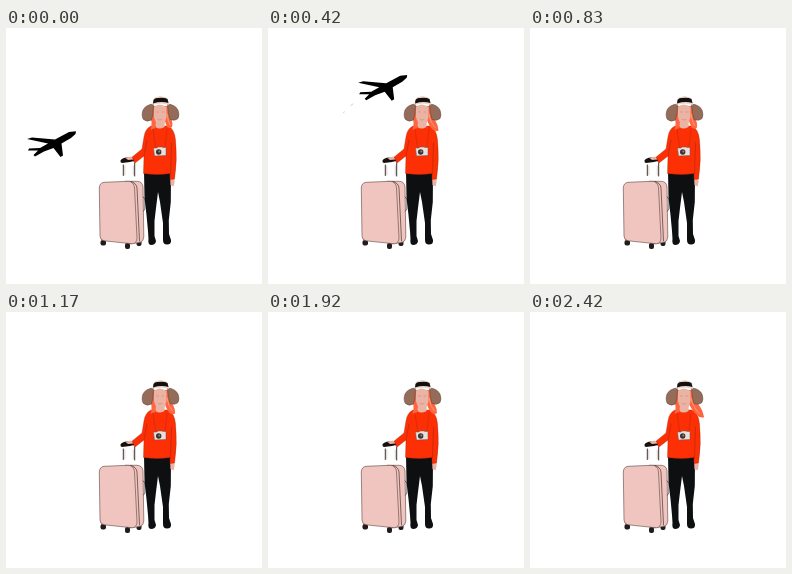
These frames come from a looping animation (256 px wide and 256 px high, 2.51 s). An HTML page:

```html
<!DOCTYPE html>
<html lang="en">
<head>
<meta charset="utf-8">
<title>Traveller</title>
<style>
html, body { margin: 0; width: 100%; height: 100%; overflow: hidden; background: #fff; }
svg { display: block; width: 100%; height: 100%; }
.line { fill: none; stroke: #2b1b19; stroke-width: .6; stroke-linecap: round; }
.case { fill: #f1c5bf; stroke: #5b4340; stroke-width: .6; }
.skin { fill: #eab3a4; }
.hair { fill: #ff6540; }
.top { fill: #fd2f05; stroke: #a82a10; stroke-width: .4; }
.brim { fill: #946c59; stroke: #5a4236; stroke-width: .5; }
</style>
</head>
<body>
<svg viewBox="0 0 256 256">
  <g id="plane">
    <path d="M21 111 26 109.500 49 111.500 63 104 70 103.300 69.500 106 65 110 55.500 115.500 57 127.500 54.500 129 47.500 120 38 123.500 29 128.500 27.500 127 32 122.500 22 122.500 23 120.500 34 120 42 115.500Z"/>
    <path id="trail" d="M16 132l-2.500 2M7.500 140l-1.500 1.200" stroke="#bbb" stroke-width=".8"/>
  </g>

  <g id="suitcase">
    <path d="M117.300 137V147.500M128.700 135V148" class="line" style="stroke-width:.9"/>
    <path d="M118.800 138V147M127.300 138V147" class="line" style="stroke:#b9aaa7"/>
    <g fill="#211b1b">
      <rect x="94.500" y="212" width="5.500" height="5.500" rx="2"/>
      <rect x="119" y="215" width="5" height="6" rx="2"/>
      <rect x="130.500" y="212" width="5" height="6" rx="2"/>
    </g>
    <path class="case" d="M119 153.300H131Q136.500 153.500 137 159L137.800 209Q137.500 213.500 134 214.500L124 215.800Z"/>
    <path class="case" d="M98 154.300 122 153.300Q128 153.300 128.500 160L131 210Q131 215 126.500 215.800L98 212.800Q94 212 94 208L93.300 160Q93.500 155 98 154.300Z"/>
    <path class="line" d="M125 153.500Q130.500 155 131 160L133.500 213M137.200 169 138.800 171V181L137.500 183"/>
  </g>

  <g id="legs" fill="#0e0f11">
    <path d="M138 143H165L164.800 174 162.800 192 163 206 165 212Q165.500 216.500 161 216.500 157 216.500 157 212L157 195 154 174 152 164 150 180 148.500 193 148.500 208 150 213Q149.500 217 145 217 141.500 216.500 142.500 211L142 203 140.500 187 138.500 170Z"/>
  </g>

  <path class="skin" d="M164 147 168 147Q169.500 153 167.500 158.500L164.500 157Z"/>
  <path class="top" d="M145 98Q139 101 138 109L136 121 125 130 129 135 138 128 137.500 145.500Q152 147.500 164 145.500L164 151.500 168.500 151Q171.500 132 169.500 112 168.500 101 162 98Z"/>
  <path class="line" style="stroke:#a82a10" d="M141 112 138 128M165.500 115 164.500 146"/>

  <path d="M114.500 132.500Q116 129.800 121 129.500L127 130.500 128 133 124 134 116 135Q114 134.500 114.500 132.500Z" fill="#17100f"/>
  <path class="skin" d="M119.500 130 125 128.500 127.500 131.500 122 132Z"/>

  <path class="skin" d="M149 90H159L158.500 99Q153 102 149.500 99Z"/>
  <path class="hair" d="M146 78H163L163 92 146 92Z"/>
  <path class="hair" d="M146 80Q144 89 145.500 94 146 98 144.500 102L149.500 100 150 93 149 80Z"/>
  <path class="hair" id="lock"/>
  <path class="line" id="strand" style="stroke:#ffc0a0"/>
  <path class="skin" d="M148 79Q153 74 160.500 79L160.500 89Q159 96.500 154 97 149.500 96.500 148 89Z"/>
  <path class="line" style="stroke:#c0705e;stroke-width:.4" d="M150.500 84h2M156 84h2M152 91.500Q154 93 156 91.500"/>

  <g id="hat">
    <path class="brim" d="M147.500 76Q140 76.500 137 82 135 88 137.500 91.500 141 94.500 145.500 92 147.500 87 147.500 76Z"/>
    <path class="brim" d="M161.500 76Q169 76.500 172 82 173.800 87 172 90.500 169 93.500 164 91.500 162 86 161.500 76Z"/>
    <path fill="#ead9cc" d="M146.500 77Q146.500 68.300 152 68.700 154 67.500 157 68.700 162.500 68.300 163 77 155 74.500 146.500 77Z"/>
    <path fill="#15100f" d="M147.500 72Q149 69.500 152 70 158 69 161.500 71L162.500 75Q155 73 147 75.500Z"/>
  </g>

  <path class="line" style="stroke:#b52a12;stroke-width:.5" d="M147 101 149.500 119M161 101 159 119"/>
  <g id="camera">
    <path d="M147.500 120H151L152 119H156L157 119.500H160V127.500L148.500 128Z" fill="#eadfda" stroke="#6a5654" stroke-width=".5"/>
    <circle cx="152.700" cy="124" r="2.700" fill="#3b3232"/>
    <circle cx="153.300" cy="123.500" r="1" fill="#948886"/>
  </g>
</svg>
<script>
const LOOP = 2510, STEP = 250 / 3, LAST = 29;
const get = id => document.getElementById(id);
const plane = get('plane'), trail = get('trail'), lock = get('lock'), strand = get('strand');

// Wind strength at a few steps, joined smoothly
const wind = [[0, 0], [2, .05], [5, .5], [7, .35], [10, .1], [14, .35], [16, 1], [19, .1], [22, .2], [26, 1], [29, .9]];

function sway(n) {
  const k = Math.max(1, wind.findIndex(([at]) => at >= n));
  const [a, from] = wind[k - 1], [b, to] = wind[k];
  const u = (n - a) / (b - a);
  return from + (to - from) * u * u * (3 - 2 * u);
}

// Whole steps, with start times rounded to 10 ms
function stepAt(t) {
  let n = Math.min(LAST, Math.floor((t + 4) / STEP));
  if (Math.round(n * STEP / 10) * 10 > t) n--;
  return n;
}

function draw(n) {
  const x = 10.74 * n + .62 * n * n, y = -11.64 * n + .075 * n * n;
  plane.setAttribute('transform', `translate(${x} ${y})`);
  plane.style.display = n < 10 ? '' : 'none';
  trail.style.display = n ? '' : 'none';

  const s = sway(n), tx = 166 + 9 * s, ty = 99 + 7 * s;
  lock.setAttribute('d', `M158 80L162 80Q165 88 ${166 + 3 * s} 93Q${167 + 6 * s} ${96 + s} ${tx} ${ty}Q${164 + 6 * s} ${101 + 6 * s} ${161 + 6 * s} ${99 + 4 * s}Q159 95 158 88Z`);
  strand.setAttribute('d', `M161 86Q162 94 ${164 + 6 * s} ${97 + 5 * s}`);
}

const start = performance.now();
function tick() {
  draw(stepAt((performance.now() - start) % LOOP));
  requestAnimationFrame(tick);
}
tick();
</script>
</body>
</html>
```
